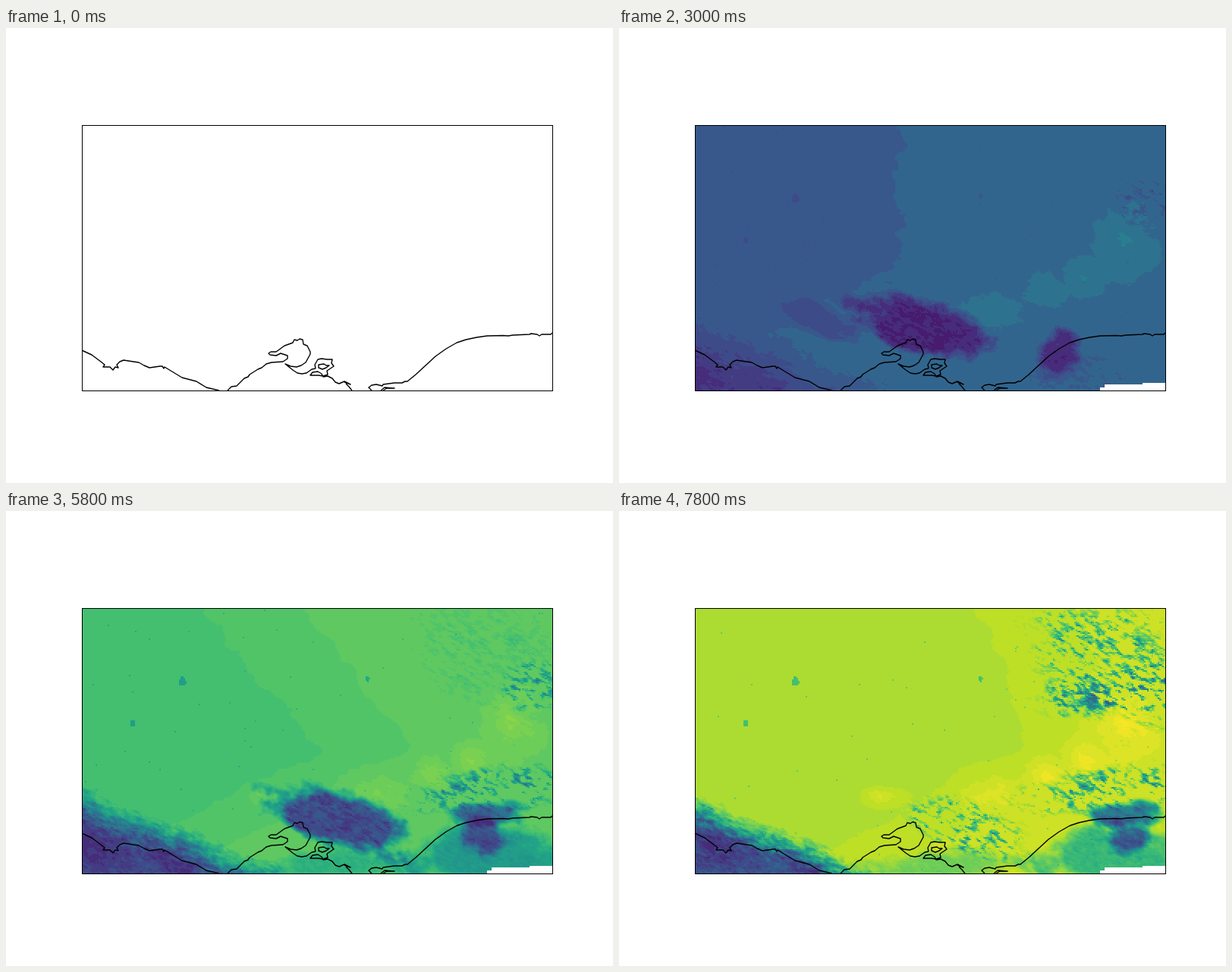
These frames come from a looping animation (800x600 px, 8 s). An HTML page with a canvas:

```html
<!DOCTYPE html>
<html lang="en">
<head>
<meta charset="utf-8">
<title>Coastal radiation map</title>
<style>
html, body { margin: 0; width: 100%; height: 100%; overflow: hidden; background: #fff; }
canvas, svg { position: absolute; display: block; }
canvas { left: 100px; top: 128px; width: 620px; height: 350px; image-rendering: pixelated; }
svg { left: 0; top: 0; }
path { fill: none; stroke: #000; stroke-width: 1.4; stroke-linejoin: round; }
</style>
</head>
<body>
<canvas id="map" width="310" height="175"></canvas>
<svg width="800" height="600" viewBox="0 0 800 600">
  <path d="M100 425L113 431 125 440 130 444 128 447 137 447 141 451 144 447 148 448 146 444 150 440 155 438 168 440 175 441 182 445 189 448 203 446 206 446 208 449 209 447 232 461 251 466 264 474 281 478"/>
  <path d="M292 478L297 473 304 472 314 462 319 460 321 457 332 450 337 448 343 443 350 441 365 440 371 436 371 432 362 429 356 432 348 431 346 429 349 427 356 427 367 419 378 415 380 411 384 412 387 410 391 411 392 417 397 419 401 427 401 430 395 441 389 445 383 447 375 446 368 443 378 451 384 455 390 456 396 455 403 450 408 449"/>
  <path d="M408 449L407 444 411 437 416 436 423 437 430 437 429 442 432 446 426 450 423 452 424 457 418 459 412 458 401 458 404 454 411 453 416 456 418 460 424 459 430 462 434 467 439 469 446 466 454 470 446 467M448 469L452 473 456 478M412 444L419 443 422 445 426 445 422 448 417 450 412 448Z"/>
  <path d="M482 478L478 474 482 471 488 470 496 472 497 470 512 468 522 468 526 466 529 466 540 457 553 445 566 433 580 423 594 415 606 411 620 408 634 406 655 405.5 662 406 668 405 690 404 692 403 700 404 703 406 706 404 718 404 720 402M494 478L499 474 512 475 502 475 497 478"/>
  <rect x="100.5" y="128.5" width="620" height="350" fill="none" stroke="#000"/>
</svg>
<script>
const W = 310, H = 175, STEP = 200, STEPS = 40, PAD = 40;
const ctx = document.getElementById('map').getContext('2d');
const img = ctx.createImageData(W, H);

const clamp = (v, a, b) => Math.max(a, Math.min(b, v));
const mix = (a, b, t) => a + (b - a) * t;
const smooth = t => { t = clamp(t, 0, 1); return t * t * (3 - 2 * t); };
const hash = (x, y, s) => {
  let h = Math.imul(x, 374761393) ^ Math.imul(y, 668265263) ^ Math.imul(s, 1274126177);
  h = Math.imul(h ^ (h >>> 13), 1274126177);
  h = Math.imul(h ^ (h >>> 15), 2246822519);
  return ((h ^ (h >>> 16)) >>> 0) / 4294967296;
};

function valueNoise(x, y, s) {
  const i = Math.floor(x), j = Math.floor(y), u = smooth(x - i), v = smooth(y - j);
  return mix(mix(hash(i, j, s), hash(i + 1, j, s), u),
             mix(hash(i, j + 1, s), hash(i + 1, j + 1, s), u), v);
}

// Layered noise stretched along a tilted axis, wide enough to drift with the wind
function field(length, width, tilt, octaves, seed) {
  const out = new Float32Array((W + PAD) * H), c = Math.cos(tilt), s = Math.sin(tilt);
  for (let j = 0; j < H; j++) for (let i = 0; i < W + PAD; i++) {
    let sum = 0, amp = 1, total = 0;
    for (let o = 0; o < octaves; o++, amp *= 0.6) {
      const f = 2 ** o;
      sum += amp * valueNoise((i * c + j * s) * f / length, (j * c - i * s) * f / width, seed + o);
      total += amp;
    }
    out[j * (W + PAD) + i] = sum / total;
  }
  return out;
}
const broad = field(20, 14, .4, 4, 1), fine = field(4, 1.7, .45, 2, 11);

const viridis = ['440154', '482475', '414487', '355f8d', '2a788e', '21918c', '22a884', '44bf70',
  '7ad151', 'bddf26', 'fde725'].map(h => [0, 2, 4].map(i => parseInt(h.slice(i, i + 2), 16)));

// Coarse steps for dark values, fine ones for bright values
const level = v => v < .45 ? (Math.floor(v * 20) + .5) / 20 : Math.max(.475, Math.round(v * 40) / 40);
const colors = Array.from({ length: 1001 }, (_, n) => {
  const p = clamp(level(n / 1000), 0, .99) * 10, i = Math.floor(p);
  return viridis[i].map((c, ch) => Math.round(mix(c, viridis[i + 1][ch], p - i)));
});

// Rising brightness and the front between two levels: [step, brightness, x at the top, lean]
const sky = [
  [1, .01, 398, -.5], [8, .1, 398, -.5], [15, .3, 380, -.05], [21, .4875, 400, .2],
  [29, .7125, 262, .8], [35, .8375, 400, .75], [39, .8875, 480, .3]
];
function skyAt(k) {
  const n = clamp(sky.findIndex(s => s[0] >= k), 1, sky.length - 1), a = sky[n - 1], b = sky[n];
  const [, light, x, lean] = a.map((v, i) => mix(v, b[i], (k - a[0]) / (b[0] - a[0])));
  return { light, x, lean };
}

// Position holds at step 21; clouds drift by vx, vy per step and fade in and out
const clouds = [
  { x: 415, y: 400, rx: 100, ry: 34, vx: 3, vy: 1, tilt: .3, depth: .7, born: 4, gone: 38 },
  { x: 240, y: 382, rx: 75, ry: 22, vx: -3, tilt: .4, depth: .25, born: 8, gone: 28 },
  { x: 605, y: 430, rx: 33, ry: 33, vx: 3.7, depth: .6, born: 4 },
  { x: 602, y: 402, rx: 57, ry: 17, vx: 4, depth: .55, born: 22 },
  { x: 620, y: 450, rx: 108, ry: 44, vx: 2, depth: .28, born: 12 },
  { x: 587, y: 342, rx: 23, ry: 24, depth: .6, born: -9, gone: 13 },
  { x: 425, y: 467, rx: 95, ry: 25, depth: .15, born: 22 },
  { x: 693, y: 230, rx: 42, ry: 32, depth: .45, born: -9, grain: 1 },
  { x: 648, y: 200, rx: 110, ry: 75, tilt: .6, depth: .45, born: 27, grain: 1 },
  { x: 612, y: 250, rx: 62, ry: 26, depth: .45, born: 29, grain: 1 },
  { x: 645, y: 368, rx: 115, ry: 32, tilt: -.12, depth: .5, born: 22, grain: 1 },
  { x: 458, y: 418, rx: 82, ry: 34, tilt: .32, depth: .5, born: 27, grain: 1 }
];
const cloudAt = (k, { x, y, vx = 0, vy = 0, tilt = 0, depth, born, gone = 99, ...rest }) => ({
  ...rest, x: x + vx * (k - 21), y: y + vy * (k - 21), c: Math.cos(tilt), s: Math.sin(tilt),
  depth: depth * smooth((k - born) / 8) * smooth((gone - k) / 8)
});

const glows = [[672, 285, 42, 52], [560, 345, 36, 24], [612, 328, 34, 26], [490, 375, 44, 26], [345, 375, 26, 12]];
const spots = [[233, 224, 7], [167, 279, 4], [477, 222, 4]];

function clearSky(x, y, s, k, n, f) {
  const front = s.x + s.lean * Math.min(y - 128, 190) - 2 * Math.max(0, y - 318);
  const dx = x - front;
  const slope = clamp(dx * (dx < 0 ? .00014 : .0002), -.02, .03);
  let g = 0;
  for (const [gx, gy, rx, ry] of glows)
    g = Math.max(g, Math.exp(-(((x - gx) / rx) ** 2) - ((y - gy) / ry) ** 2));
  return s.light + slope + (n - .5) * .008 + .055 * g * (n * 1.5 + f * .5) * clamp(k / 8, 0, 1);
}

// Share of light kept under the bank along the lower left
function bankLight(x, y, k, m, f) {
  const top = 362 + Math.max(0, k - 24) + .4 * (x - 100);
  const width = mix(110, 46, smooth((k - 18) / 14));
  const inside = y - top + (m - .5) * 18 + (f - .5) * 18;
  if (inside < 0) return 1;
  const depth = .76 * smooth((k - 2) / 20);
  return 1 - depth * smooth(inside / width + .1) * clamp(1 + (m - .5) * .35 + (f - .5) * .25, 0, 1.12);
}

function cloudLight(c, x, y, m, f) {
  const dx = x - c.x, dy = y - c.y;
  const r = Math.hypot((dx * c.c + dy * c.s) / c.rx, (dy * c.c - dx * c.s) / c.ry) + (m - .5) * 1.1;
  if (r > 1.2) return 1;
  const w = c.grain
    ? smooth((1.2 - r) / .6) * clamp((f * .6 + m * .6 - .58) / .24, 0, 1.2)
    : smooth((1.15 - r) / .6) * (.8 + f * .4);
  return 1 - Math.min(.9, c.depth * w);
}

function render(k) {
  if (!k) return ctx.clearRect(0, 0, W, H);
  const s = skyAt(k), d = img.data;
  const live = clouds.map(c => cloudAt(k, c)).filter(c => c.depth > .01);
  for (let j = 0, o = 0; j < H; j++) for (let i = 0; i < W; i++, o += 4) {
    const x = 101 + 2 * i, y = 129 + 2 * j, at = j * (W + PAD) + i, wind = at + PAD - k;
    const m = broad[wind], f = fine[wind];
    let v = clearSky(x, y, s, k, broad[at], fine[at]) * bankLight(x, y, k, m, f);
    for (const c of live) v *= cloudLight(c, x, y, m, f);
    if (k > 11) {
      for (const [sx, sy, r] of spots)
        if (Math.hypot((x - sx) * 1.6, y - sy) < r * (.5 + fine[at])) v *= .8;
      if (hash(i, j, 50 + k) < .0012) v *= .87;
    }
    [d[o], d[o + 1], d[o + 2]] = colors[Math.round(clamp(v, 0, 1) * 1000)];
    const noData = x > 634 && y > 474 || x > 640 && y > 470 || x > 690 && y > 468;
    d[o + 3] = noData ? 0 : 255;
  }
  ctx.putImageData(img, 0, 0);
}

let shown = -1;
const start = performance.now();
function tick() {
  const k = Math.floor((performance.now() - start) / STEP) % STEPS;
  if (k !== shown) render(shown = k);
  requestAnimationFrame(tick);
}
tick();
</script>
</body>
</html>
```
